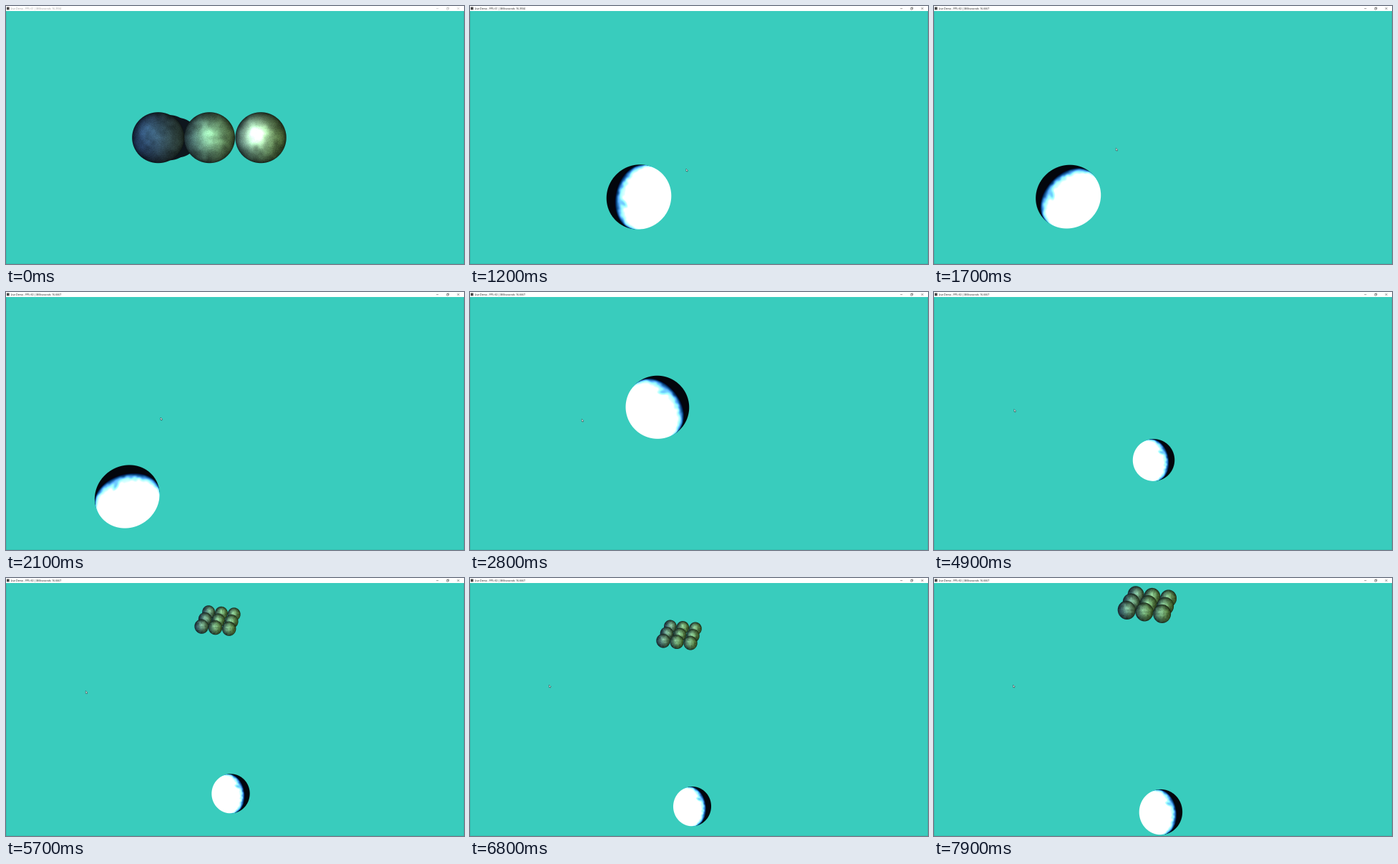
Animation, 640 px wide and 360 px high, one loop 8 s. Source, as an HTML page with a canvas:

```html
<!DOCTYPE html>
<html lang="en">
<head>
<meta charset="utf-8">
<title>Live Demo</title>
<style>
  html, body { margin: 0; width: 100%; height: 100%; overflow: hidden; background: #39ccbd; }
  canvas { display: block; width: 640px; height: 360px; }
</style>
</head>
<body>
<canvas id="stage" width="640" height="360"></canvas>
<script>
const ctx = document.getElementById('stage').getContext('2d');
const scratch = document.createElement('canvas');
const pen = scratch.getContext('2d');
const LOOP = 8000, STEP = 100;
const CENTER = { x: 320, y: 184 }, FOCAL = 450, FAR_RADIUS = 26.5;

// Turning points of the camera move: time, x, y, radius
const PLANET = [
  [1000, 278, 240, 44.5], [1200, 236, 266.5, 44.5], [1800, 178, 266, 43.5], [2100, 169.3, 285.5, 43],
  [2400, 205, 127, 44], [3300, 333, 203, 44], [3800, 331, 201, 44], [4400, 336, 315, 42],
  [4900, 307, 234.5, 29.2], [5300, 314, 300, 28], [6200, 314, 302, 25], [6800, 310.5, 318.7, FAR_RADIUS],
  [7900, 316.9, 326.6, 30.2]
];
const CURSOR = [[500, 322, 205], [1200, 302, 227], [2100, 216, 175], [3400, 105, 179], [4900, 112, 163.5], [6800, 110.5, 149]];

const clamp = (v, lo = 0, hi = 1) => Math.min(hi, Math.max(lo, v));
const ramp = (a, b, v) => clamp((v - a) / (b - a));
const mix = (a, b, k) => a + (b - a) * k;
const smooth = k => k * k * (3 - 2 * k);

function pose(keys, t) {
  let i = 0;
  while (i < keys.length - 2 && keys[i + 1][0] <= t) i++;
  const k = ramp(keys[i][0], keys[i + 1][0], t);
  return keys[i].slice(1).map((v, j) => mix(v, keys[i + 1][j + 1], k));
}

function hash(x, y) {
  const v = Math.sin(x * 127.1 + y * 311.7) * 43758.5453;
  return v - Math.floor(v);
}

function noise(x, y) {
  const ix = Math.floor(x), iy = Math.floor(y);
  const fx = smooth(x - ix), fy = smooth(y - iy);
  return mix(mix(hash(ix, iy), hash(ix + 1, iy), fx),
             mix(hash(ix, iy + 1), hash(ix + 1, iy + 1), fx), fy);
}

// Shades a sphere per pixel, stretched away from the view centre by perspective
function ball(cx, cy, r, shade) {
  const offX = cx - CENTER.x, offY = cy - CENTER.y, off = Math.hypot(offX, offY) || 1;
  const stretch = Math.hypot(1, off / FOCAL), reach = r * stretch + 1;
  const left = Math.floor(cx - reach), top = Math.floor(cy - reach), size = Math.ceil(2 * reach + 1);
  scratch.width = scratch.height = size;
  const image = pen.createImageData(size, size);
  for (let y = 0; y < size; y++) {
    for (let x = 0; x < size; x++) {
      const dx = (left + x + 0.5 - cx) / r, dy = (top + y + 0.5 - cy) / r;
      const squeeze = (dx * offX + dy * offY) / (off * off) * (1 / stretch - 1);
      const nx = dx + offX * squeeze, ny = dy + offY * squeeze;
      const d = Math.hypot(nx, ny), cover = clamp((1 - d) * r + 0.5);
      if (!cover) continue;
      const color = shade(nx, ny, Math.sqrt(Math.max(0, 1 - d * d)));
      image.data.set([...color, cover * 255], (y * size + x) * 4);
    }
  }
  pen.putImageData(image, 0, 0);
  ctx.drawImage(scratch, left, top);
}

// angle points to the unlit side
function planetShade(angle) {
  const ux = Math.cos(angle), uy = Math.sin(angle);
  return (x, y, z) => {
    const a = x * ux + y * uy, b = x * uy - y * ux;
    const clouds = noise(a * 9 + 20, b * 9 + 9);
    const tongue = Math.exp(-(((a - 0.42) / 0.2) ** 2) - ((b - 0.3 + (a - 0.4) * 0.4) / 0.11) ** 2);
    let lit = 0.7 * (z - a) + 0.015;
    lit += (clouds - 0.5) * 0.08 * ramp(0, 0.15, lit);
    if (lit > 0.14) lit = mix(lit, 0.14, tongue * 0.85);
    return [3 + 252 * ramp(0.05, 0.32, lit), 6 + 249 * ramp(0, 0.21, lit), 12 + 243 * ramp(-0.02, 0.14, lit)];
  };
}

// Mottled metal: bluish on the left, yellow-green on the right, with a soft highlight
function metalShade(base, glow, hx, hy, seed) {
  const tilt = [10, 8, -24];
  return (x, y, z) => {
    const grain = 0.72 + 0.4 * noise(x * 5 + seed, y * 5) + 0.2 * hash(Math.round(x * 70), Math.round(y * 70) + seed);
    const body = (0.2 + 0.8 * z) * grain;
    const patch = 0.8 + 0.4 * noise(x * 6 + seed * 3, y * 6 + 4);
    const shine = Math.exp(-((x - hx) ** 2 + (y - hy) ** 2) / 0.25) * patch * ramp(0, 0.6, z);
    return base.map((v, i) => clamp((v + tilt[i] * x) * body + glow[i] * shine, 0, 255));
  };
}

function drawRow(lift) {
  const y = 183.7 - lift, r = 35.5;
  const shadow = () => [14, 22, 29];
  ball(240, y, r * 0.78, shadow);
  ball(228, y, r * 0.89, shadow);
  const looks = [
    metalShade([46, 70, 88], [22, 38, 44], -0.35, -0.2, 2),
    metalShade([80, 116, 94], [82, 118, 88], 0, -0.1, 7),
    metalShade([84, 120, 88], [190, 222, 190], -0.2, -0.13, 11)
  ];
  looks.forEach((look, i) => ball(212.7 + 71.7 * i, y, r, look));
}

// The grid of nine hangs above the planet and scales with its distance
function drawGrid(planetX, planetY, planetR) {
  const near = planetR / FAR_RADIUS, scale = near ** 2;
  const x = planetX - 21.5 * near ** 0.5, y = planetY - 229.5 * near ** 1.5;
  for (let row = 2; row >= 0; row--) {
    const far = scale * (1 - row * 0.04);
    for (let col = -1; col <= 1; col++) {
      const base = col < 0 ? [62, 98, 86] : [72, 112, 74];
      const shade = metalShade(base, [68, 92, 72], -0.1 * col, -0.2, row * 5 + col + 8);
      ball(x + col * 19 * far + row * 4.2 * scale, y + col * 1.5 * scale ** 2 - row * 10 * near ** 0.5, 9.6 * far, shade);
    }
  }
}

function drawCursor(x, y) {
  ctx.save();
  ctx.translate(x, y);
  ctx.fillStyle = '#fff';
  ctx.strokeStyle = '#233';
  ctx.lineWidth = 0.5;
  const arrow = new Path2D('M0 0V3.8L.9 3.1 1.5 4.3 2 4 1.5 2.8 2.7 2.7Z');
  ctx.fill(arrow);
  ctx.stroke(arrow);
  ctx.restore();
}

function drawTitle(t) {
  const ink = t < 300 ? '#999' : '#111';
  ctx.fillStyle = '#fff';
  ctx.fillRect(0, 0, 640, 7);
  ctx.fillStyle = '#444';
  ctx.fillRect(1, 1.5, 3.6, 3.8);
  ctx.fillStyle = ctx.strokeStyle = ink;
  ctx.save();
  ctx.scale(0.25, 0.25);
  ctx.font = '14px "Open Sans", sans-serif';
  const fps = t < 1500 ? 61 : 60;
  ctx.fillText(`Live Demo - FPS: ${fps} | Milliseconds: ${(1000 / fps).toFixed(4)}`, 27, 19.5);
  ctx.restore();
  ctx.lineWidth = 0.4;
  ctx.stroke(new Path2D('M601.3 3.6h3M630.5 2l3 3m0-3l-3 3M615.8 2.7h2.3v2.3h-2.3zM616.5 2.6V2h2.3v2.3h-.6'));
}

function drawFrame() {
  ctx.strokeStyle = 'rgba(20, 80, 80, 0.3)';
  ctx.lineWidth = 0.5;
  ctx.stroke(new Path2D('M.25 7V359.75H639.75V7'));
}

function draw(t) {
  ctx.fillStyle = '#39ccbd';
  ctx.fillRect(0, 0, 640, 360);
  if (t < 800) drawRow(240 * ramp(200, 700, t) ** 2);
  if (t >= 1000) {
    const planet = pose(PLANET, t);
    const angle = mix(-172, -12, smooth(ramp(1000, 3400, t)));
    ball(...planet, planetShade(angle * Math.PI / 180));
    if (t > 4900) drawGrid(...planet);
  }
  if (t >= 500) drawCursor(...pose(CURSOR, t));
  drawFrame();
  drawTitle(t);
}

let shown = -1;
const start = performance.now();
function tick() {
  const t = Math.floor(((performance.now() - start) % LOOP) / STEP) * STEP;
  if (t !== shown) draw(shown = t);
  requestAnimationFrame(tick);
}
tick();
</script>
</body>
</html>
```
